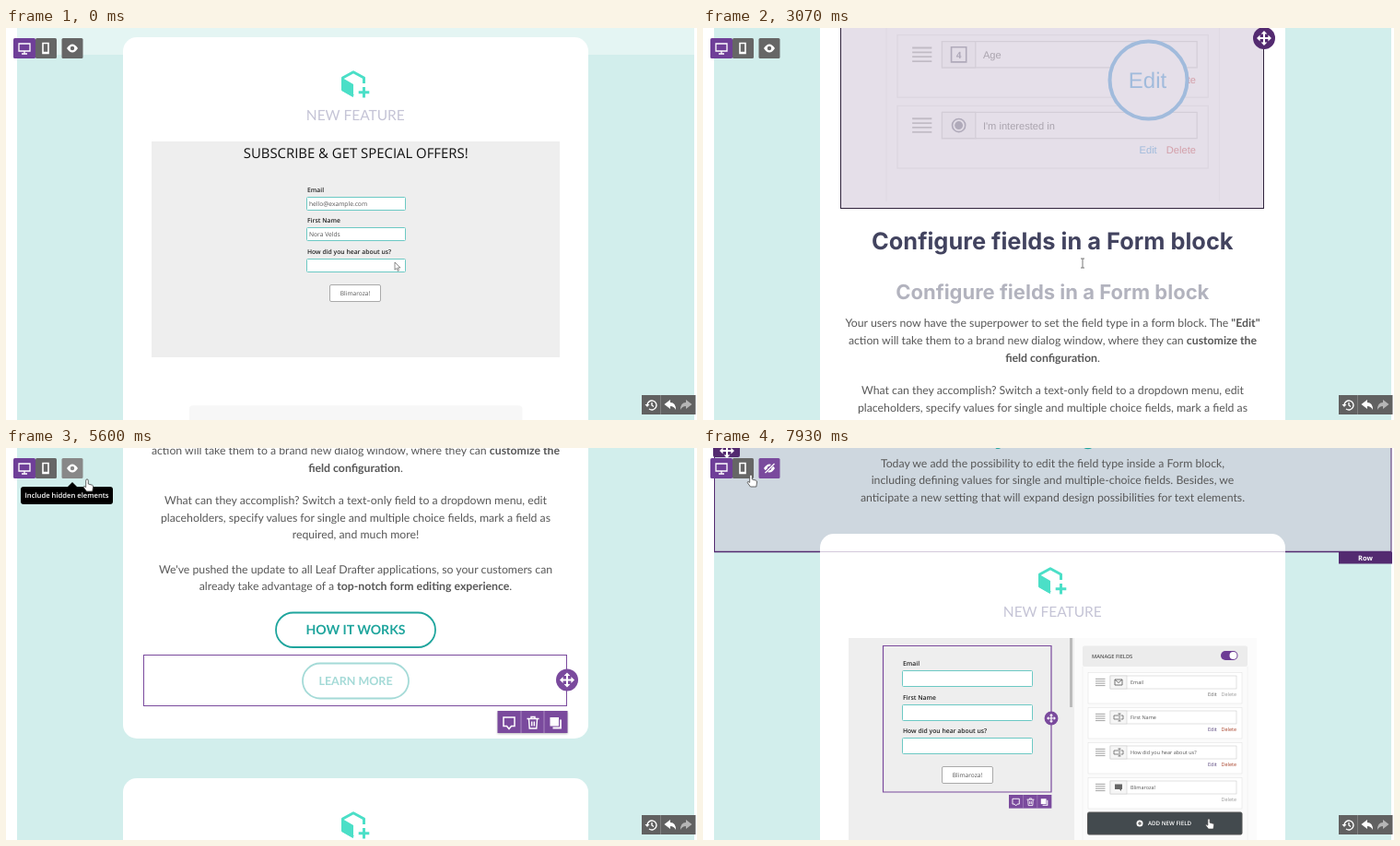
Recreate the animation shown at these times as an HTML page. Size 750x425 px, loop 8000 ms.

```html
<!DOCTYPE html>
<html lang="en">
<head>
<meta charset="utf-8">
<title>Page editor</title>
<style>
html, body { margin: 0; width: 100%; height: 100%; overflow: hidden; background: #fff; }
svg { display: block; width: 750px; height: 425px; text-rendering: geometricPrecision; }
.faded { opacity: .4; filter: blur(.7px); }
</style>
</head>
<body>
<svg id="stage" viewBox="0 0 750 425" xmlns="http://www.w3.org/2000/svg"></svg>
<script>
const LOOP = 8000;
const TEAL = '#4bdfc7', DEEP = '#1fa59d', PURPLE = '#7a4a9d', DARK = '#532a70';
const LATO = 'Lato, sans-serif', OPEN = "'Open Sans', sans-serif";
const INTER = 'Inter, sans-serif', ARIAL = "'Liberation Sans', sans-serif";
const BUTTON = 'Blimaroza!', BODY = 12.270, INK = '#585858';

// ---- drawing helpers ----
const text = (x, y, s, size, fill, font = LATO, weight = 400, anchor = 'middle') =>
  `<text x="${x}" y="${y}" font-size="${size}" fill="${fill}" font-family="${font}" font-weight="${weight}" text-anchor="${anchor}">${s}</text>`;
const left = (x, y, s, size, fill, font = OPEN, weight = 400) => text(x, y, s, size, fill, font, weight, 'start');
const rect = (x, y, w, h, fill, more = '') =>
  `<rect x="${x}" y="${y}" width="${w}" height="${h}" fill="${fill}" ${more}/>`;
const line = (d, color, width = 1, more = '') =>
  `<path d="${d}" fill="none" stroke="${color}" stroke-width="${width}" ${more}/>`;
const group = (id, body, more = '') => `<g id="${id}" ${more}>${body}</g>`;
const at = (x, y, body, scale = 1) => `<g transform="translate(${x} ${y}) scale(${scale})">${body}</g>`;
const bold = s => `<tspan font-weight="700">${s}</tspan>`;

const arrows = line('M-6 0H6M0-6V6', '#fff', 2) +
  '<path d="M-8 0l3.6-3.4v6.8zM8 0l-3.6-3.4v6.8zM0-8l-3.4 3.6h6.8zM0 8l-3.4-3.6h6.8z" fill="#fff"/>';
const handle = fill => `<circle r="12" fill="${fill}"/>` + arrows;

const tools = rect(0, 0, 76, 24, PURPLE) + line('M25.5 0V24M50.5 0V24', '#b79acb', .8) +
  line('M6.5 7h12v9.500h-3.500l-2.500 3-2.500-3h-3.500z', '#fff', 1.5) +
  line('M32 8.500h13M36.500 8V6.500h4V8M34 9l.7 10h7.600l.7-10M37.200 11.500v5M39.800 11.500v5', '#fff', 1.4) +
  rect(57, 7, 9.500, 9.500, '#fff') + line('M60 18.500h8.500V9.500', '#fff', 1.8);

const monitor = line('M-6-5H6V3H-6zM-3 6H3M0 3V6', '#fff', 1.3);
const crossedMonitor = line('M-4-3.500H4V2H-4zM-2 4H2M-5-5L5 5', '#fff', 1);
const phone = line('M-3-5.500H3V5.500H-3z', '#fff', 1.6) + line('M-3 4.500H3', '#fff', 1.5);
const eye = '<path d="M-6 0Q0-9 6 0Q0 9-6 0z" fill="#fff"/>';

const cube = y => at(364, y,
  line('M24.500 14V8L13 1.700 1.500 8V21L13 27.500', TEAL, 3, 'stroke-linejoin="round"') +
  `<path d="M1 8l12 7v14L1 22z" fill="${TEAL}"/>` + line('M24.500 18V29.500M18.700 23.700H30.300', TEAL, 3));
const feature = y => cube(y) + text(379.3, y + 54, 'NEW FEATURE', 15.500, '#c5c4d6');

function form(x, w, h, y, step, values, bx, by) {
  const labels = ['Email', 'First Name', 'How did you hear about us?'];
  return labels.map((label, i) => {
    const top = Math.round(y + i * step);
    return left(x + 1, top - 5.500, label, 6.800, '#222', OPEN, 600) +
      rect(x + .5, top + .5, w, h, '#fff', 'rx="1" stroke="#6cc9c4"') +
      left(x + 3, top + h / 2 + 2.800, values[i] || '', 6.700, '#555');
  }).join('') + rect(bx + .5, by + .5, 55, 18, '#fff', 'rx="1.500" stroke="#aaa"') +
    text(bx + 28, by + 12, BUTTON, 6.600, '#555', OPEN);
}

const icons = {
  mail: line('M-4-3H4V3H-4zL0 .5 4-3', '#666', .9),
  field: line('M-5-2H0M-5 2H0M-5-2V2M1-4V4M-.5-4H2.500M-.5 4H2.500M2.500-2H5V2H2.500', '#666', .8),
  chat: '<path d="M-4-3.500H4V2H3V4L1 2H-4z" fill="#666"/>',
  number: line('M-4-4H4V4H-4z', '#667', .8) + text(0, 2, '4', 5, '#667', OPEN, 700),
  radio: line('M-3.500 0a3.500 3.500 0 1 0 7 0a3.500 3.500 0 1 0-7 0', '#667', .8) + '<circle r="2.200" fill="#667"/>'
};

// Each row: icon, label, edit colour (empty for none), delete colour
function panel(rows, font) {
  return rect(412, 131.500, 179, 22.500, '#ececec', 'rx="2"') +
    line('M412 154V360M591 154V360', '#eee', .6) +
    left(422, 144.500, 'MANAGE FIELDS', 5.700, '#555', OPEN, 600) +
    rows.map(([icon, label, edit, del], i) => {
      const c = 171 + i * 38;
      return rect(418, c - 10.500, 167, 33.500, '#fff', 'stroke="#e4e4e4" stroke-width=".6"') +
        line([-3.600, -1.200, 1.200, 3.600].map(d => `M426 ${c + d}h10.500`).join(''), '#999', .9) +
        rect(442, c - 7, 137, 14, '#fff', 'stroke="#ccc" stroke-width=".6"') +
        rect(442, c - 7, 18, 14, '#f6f6f6', 'stroke="#ccc" stroke-width=".6"') +
        at(451, c, icons[icon]) + left(464, c + 2, label, 5.500, '#555', font) +
        (edit ? left(548, c + 15.300, 'Edit', 5.500, edit, font) : '') +
        left(562.500, c + 15.300, 'Delete', 5.500, del, font);
    }).join('');
}

// ---- page content ----
const choices = ['Search Engine', 'Social Media', 'Radio', 'TV', 'Print', 'Word of mouth'];
const pointer = '<path d="M0 0V11l2.500-2.400 1.700 3.900 1.800-.8-1.700-3.800H8z" fill="#fff" stroke="#444" stroke-width=".8"/>';
const hand = '<path d="M-1.300 1.200a1.300 1.300 0 0 1 2.600 0V5l4.200 1.200q1.300.4 1.100 1.800L5.800 13H-.5L-4 8.300q.6-1.700 2.700.1z" fill="#fff" stroke="#444" stroke-width=".8"/>';
const beam = line('M-2-5H2M0-5V5M-2 5H2', '#777', 1);

const menu = rect(326.500, 249.500, 107, 16, '#fff', 'stroke="#4b93cf"') +
  line('M422 255.500l2.500 2.500 2.500-2.500', '#444', 1) +
  rect(326.500, 266, 106, 85.500, '#fff', 'stroke="#aaa" stroke-width=".8"') +
  group('pick', rect(327, 0, 105.500, 12.300, '#0a6cce')) +
  choices.map((c, i) => `<g class="choice">${left(329.500, 286.500 + i * 12.200, c, 6.800, '#333', ARIAL)}</g>`).join('');

const offer = rect(158, 123, 443, 234, '#eee') +
  text(379.700, 141, 'SUBSCRIBE &amp; GET SPECIAL OFFERS!', 14.900, '#111', OPEN) +
  form(326, 107, 14, 183, 33.400, ['hello@example.com', 'Nora Velds'], 351, 278) +
  group('menu', menu) + group('clipArrow', at(0, 0, pointer, .75));

const editor = rect(158, 123, 245, 234, '#eee') + rect(403, 123, 198, 234, '#fbfbfb') +
  rect(398, 123, 3, 75, '#bbb') + line('M195.500 131.500h182.500v158.500h-182.500z', PURPLE, 1.200) +
  form(216, 141, 17, 158, 36.600, [], 259, 262) +
  at(378, 210, handle(PURPLE), .62) + at(332, 293, tools, .61) +
  panel([['mail', 'Email', '#666', '#999'], ['field', 'First Name', '#54407a', '#a8432c'],
    ['field', 'How did you hear about us?', '#54407a', '#a8432c'], ['chat', BUTTON, '', '#999']], OPEN) +
  rect(562, 137, 18.500, 10, '#6c3b94', 'rx="5"') + '<circle cx="575.500" cy="142" r="4" fill="#fff"/>' +
  rect(417.500, 312, 167.500, 24, '#fff', 'id="add" rx="1.500" stroke="#555"') +
  group('plus', '<circle cx="474" cy="324" r="3.500" fill="#fff"/>' + line('M472 324h4M474 322v4', '#444', 1)) +
  group('addText', text(506.500, 326.300, 'ADD NEW FIELD', 6.200, 'currentColor', OPEN, 600)) +
  group('clipHand', at(0, 0, hand, .85));

const zoom = '<circle r="42" fill="#fff" stroke="#3a98dc" stroke-width="4"/>' + text(-1, 8, 'Edit', 24, '#3a98dc', ARIAL);
const narrow = `<g clip-path="url(#shot)">` + at(-633.400, 143.600, panel([['mail', 'Email', '#3a98dc', '#c44'],
  ['number', 'Age', '#3a98dc', '#c44'], ['radio', "I'm interested in", '#3a98dc', '#c44']], ARIAL), 2.020) +
  group('zoom', zoom) + '</g>';

const lines = [
  [861, `Your users now have the superpower to set the field type in a form block. The ${bold('"Edit"')}`],
  [880, `action will take them to a brand new dialog window, where they can ${bold('customize the')}`],
  [898.500, `${bold('field configuration')}.`],
  [933.500, 'What can they accomplish? Switch a text-only field to a dropdown menu, edit'],
  [952.500, 'placeholders, specify values for single and multiple choice fields, mark a field as'],
  [971, 'required, and much more!'],
  [1008.500, "We've pushed the update to all Leaf Drafter applications, so your customers can"],
  [1027, `already take advantage of a ${bold('top-notch form editing experience')}.`]
];
const intro = ['Today we add the possibility to edit the field type inside a Form block,',
  'including defining values for single and multiple-choice fields. Besides, we',
  'anticipate a new setting that will expand design possibilities for text elements.'];
const pill = (x, y, w, h, label, size) =>
  rect(x, y, w, h, '#fff', `rx="${h / 2}" stroke="${DEEP}" stroke-width="1.800"`) +
  text(379.500, y + h / 2 + size * .36, label, size, DEEP, LATO, 700);
const heading = 'Configure fields in a Form block';

const page = rect(12, -500, 735, 2600, '#d2eeec') + rect(12, -500, 735, 529, '#e4f5f3') +
  rect(12, 0, 735, 10, 'rgba(80,45,110,.15)', 'id="rowTint"') +
  text(379.500, -87, 'Today: editing forms', 24, DEEP, INTER, 700) +
  intro.map((s, i) => text(379.500, -62.500 + i * 18.800, s, BODY, INK)).join('') +
  rect(127, 10, 505, 0, '#fff', 'id="card" rx="15"') + feature(46) +
  group('offer', offer) + group('editor', editor) +
  group('narrow', narrow, 'class="faded"') +
  group('title', text(379.300, 777, heading, 25.400, '#42435f', INTER, 700)) +
  group('copy', text(379.300, 831, heading, 22, '#42435f', INTER, 700), 'class="faded"') +
  group('words', lines.map(([y, s]) => text(379.500, y, s, BODY, INK)).join('') +
    pill(293, 1051.500, 173, 37.500, 'HOW IT WORKS', 14.100)) +
  group('more', pill(322, 1106.500, 115, 38, 'LEARN MORE', 12.500), 'class="faded"') +
  group('tail', rect(127, 1231, 505, 700, '#fff', 'rx="15"') + feature(1267) + rect(158, 1344, 443, 234, '#eee'));

const block = rect(149.500, 0, 459, 10, 'none', 'id="frame"') +
  group('tag', rect(149.500, -15, 15, 15, PURPLE) + at(157, -7.500, crossedMonitor)) +
  group('knob', handle('currentColor')) + group('tools', tools, 'style="filter:drop-shadow(0 1px 1px #0004)"');

const rowMark = line('M12 0H127M632 0H747', DARK, 1.500) + line('M127 0H632', DARK, 1, 'opacity=".25"') +
  line('M12.500-420V0M747-420V0', DARK, 1) + rect(690, 0, 58, 13, DARK) + text(719, 9.300, 'Row', 7.500, '#fff', OPEN, 700);

const chrome = rect(8, 11, 24, 22, '#6f3f98', 'rx="1.500"') + rect(32, 11, 23, 22, '#666', 'rx="1.500"') +
  at(20, 22, monitor) + at(43, 22, phone) +
  rect(60.500, 11, 23, 22, '#666', 'id="eyeBox" rx="1.500"') +
  at(72, 22, eye + '<circle id="iris" r="2.200"/>' + group('slash', line('M-5 5L5-5', PURPLE, 3) + line('M-4.500 5L5.500-5', '#fff', 1.300))) +
  group('tip', '<path d="M72 37l5 5h-10z"/>' + rect(16, 42, 100, 19, '#000', 'rx="3"') +
    text(66, 54, 'Include hidden elements', 7.650, '#fff', OPEN, 600)) +
  rect(690, 398, 58.500, 21, '#616161') + line('M710.500 398v21', '#888', .8) +
  line('M696 409a5 5 0 1 1 2 4M701 406v3l2 1.500', '#fff', 1.400) + '<path d="M693.500 408h5l-2.500 3z" fill="#fff"/>' +
  '<path d="M721 403l-6.500 5 6.500 5v-3q4 0 6 4q0-8-6-8z" fill="#fff"/>' +
  '<path d="M738 403l6.500 5-6.500 5v-3q-4 0-6 4q0-8 6-8z" fill="#b5b5b5"/>';

document.getElementById('stage').innerHTML =
  '<defs><clipPath id="shot"><rect x="158" y="376" width="443" height="349"/></clipPath></defs>' +
  group('page', page) + group('block', block) + group('row', rowMark) +
  group('grip', rect(11, -15, 29, 25, DARK, 'rx="2"') + at(26, 3, arrows)) + chrome +
  group('arrow', pointer) + group('beam', beam) + group('hand', hand);

// ---- motion ----
const $ = id => document.getElementById(id);
const show = (id, on) => $(id).setAttribute('display', on ? 'inline' : 'none');
const move = (id, x, y, s = 1) => $(id).setAttribute('transform', `translate(${x} ${y}) scale(${s})`);
const set = (id, attrs) => { for (const k in attrs) $(id).setAttribute(k, attrs[k]); };
const ease = p => p * p * (3 - 2 * p);

// Keys are [time, value, ...]; values between keys are eased or linear.
function track(t, keys, curve = p => p) {
  let i = 0;
  while (i < keys.length - 1 && t >= keys[i + 1][0]) i++;
  const a = keys[i], b = keys[i + 1];
  if (!b || t < a[0]) return a.slice(1);
  const p = curve((t - a[0]) / (b[0] - a[0]));
  return a.slice(1).map((v, n) => v + (b[n + 1] - v) * p);
}

const TOGGLE = 5930;
const scrollOpen = [[1200, 0], [1530, 66], [2000, 380], [2500, 500], [2870, 537], [3600, 537], [4000, 873]];
const scrollShut = [[6270, 455], [6670, 184], [6930, -83]];
const mouse = [[330, 430, 418], [800, 398, 219], [2000, 398, 219], [2870, 412, 255], [3400, 412, 255],
  [4000, 400, 255], [4330, 400, 255], [5130, 88, 34], [6000, 88, 34], [6270, 188, 174],
  [7270, 188, 174], [7800, 52, 29]];
// Hovered blocks: start, end, top, bottom, has tag
const hovers = [[330, 1750, 111, 364, 1], [1750, 3200, 364, 732, 1], [3200, 3650, 732, 795, 1],
  [3650, 3950, 845, 1043, 0], [3950, TOGGLE, 1097, 1152, 1], [6100, 6330, 625, 679, 0], [6330, 6930, 111, 364, 1]];

function render(t) {
  const open = t < TOGGLE;
  // the scrolled page keeps to whole pixels
  const s = Math.round(track(t, open ? scrollOpen : scrollShut)[0]);
  move('page', 0, -s);
  for (const id of ['narrow', 'copy', 'more', 'offer']) show(id, open);
  show('editor', !open);
  move('title', 0, open ? 0 : -367);
  move('words', 0, open ? 0 : -418);
  move('tail', 0, open ? 0 : -473);
  set('card', { height: open ? 1178 : 705 });

  // recordings inside the page
  show('menu', t >= 130);
  const clip = track(t, [[130, 422, 254], [400, 410, 278], [1130, 405, 304]], ease);
  move('clipArrow', ...clip);
  const picked = t < 330 ? -1 : Math.floor((clip[1] - 277) / 12.200);
  show('pick', picked >= 0);
  move('pick', 0, 278 + picked * 12.200);
  document.querySelectorAll('.choice text').forEach((e, i) => e.setAttribute('fill', i === picked ? '#fff' : '#333'));
  show('zoom', t > 2000);
  move('zoom', 483.500, 593.500, track(t, [[2000, .2], [2400, 1]], ease)[0]);
  const solid = t > 7400;
  set('add', { fill: solid ? '#434a4e' : '#fafafa' });
  show('plus', solid);
  set('addText', { color: solid ? '#fff' : '#444' });
  move('clipHand', ...track(t, [[7270, 545, 333], [7600, 549, 319]], ease));

  // block outline
  const h = hovers.find(k => t >= k[0] && t < k[1]);
  show('block', h);
  if (h) {
    const chosen = h[2] === 1097, top = h[2] - s, bottom = h[3] - s;
    set('frame', { y: top + .5, height: bottom - top, stroke: chosen ? PURPLE : '#30233c',
      fill: chosen ? 'none' : 'rgba(80,45,110,.15)' });
    show('tag', h[4] && !(chosen && t > 4600));
    move('tag', 0, top);
    set('knob', { color: chosen ? PURPLE : DARK });
    move('knob', 609, (top + bottom) / 2);
    show('tools', chosen);
    move('tools', 533.500, bottom + 6);
  }

  // row outline
  const header = t > 7450, row = header || (t > 4700 && t < 5130);
  for (const id of ['row', 'rowTint']) show(id, row);
  show('grip', header);
  const from = header ? -500 : 29, to = header ? 29 : 1157;
  set('rowTint', { y: from, height: to - from });
  move('row', 0, to - s + .5);

  // toolbar
  const over = t > 5100 && t < 6030;
  const eyeFill = open ? (over ? '#888' : '#666') : PURPLE;
  set('eyeBox', { fill: eyeFill });
  set('iris', { fill: eyeFill });
  show('slash', !open);
  show('tip', t >= 5270 && t < 6030);

  // mouse
  const kind = t < 330 ? '' : t >= 2870 && t < 4400 ? 'beam' :
    (t >= 5050 && t < 6050) || t >= 7700 ? 'hand' : 'arrow';
  const pos = track(t, mouse, ease);
  for (const id of ['arrow', 'beam', 'hand']) {
    show(id, id === kind);
    move(id, ...pos);
  }
}

function tick() {
  render(performance.now() % LOOP);
  requestAnimationFrame(tick);
}
tick();
</script>
</body>
</html>
```
